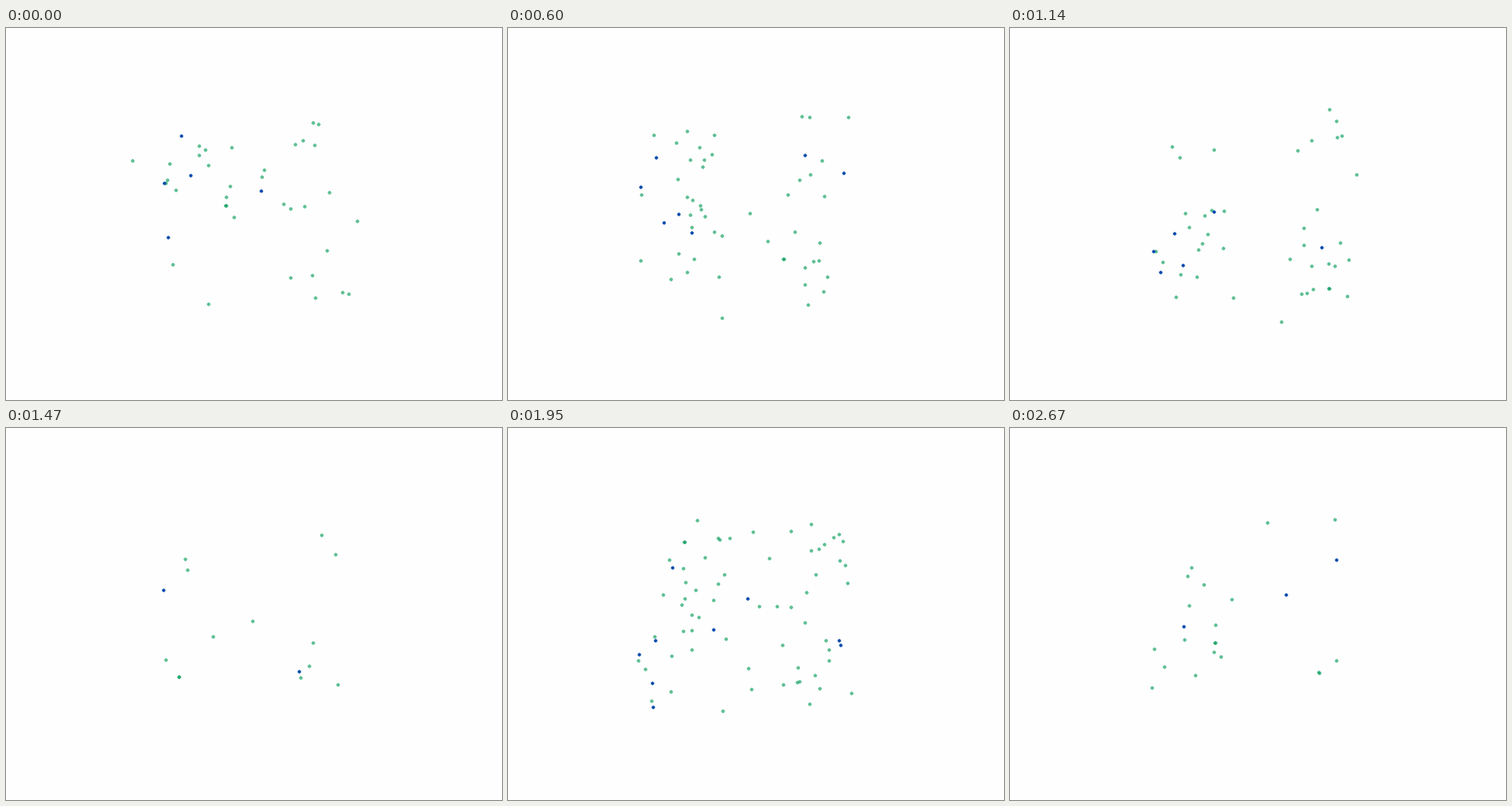
Recreate the animation shown at these times as a matplotlib script. Size 640x480 px, loop 2700 ms.

```python
import numpy as np
import matplotlib.pyplot as plt
from matplotlib.animation import FuncAnimation

W, H, DPI = 640, 480, 100
STEPS, INTERVAL = 90, 30
GREEN, BLUE, PAPER = "#009b55", "#0047ab", "#fefefe"

# The number of dots rises and falls between these points of the loop
KEY_STEPS = [0, 11, 28, 49, 65, 73, 79, 89]
KEY_COUNTS = [40, 31, 76, 15, 72, 24, 17, 23]
BLUE_SHARE = 0.13

# Dots gather around the hubs; the rest spread over the whole area
HUBS = np.array([(400, 138), (232, 172), (255, 250), (212, 308), (395, 322)])
HUB_SPREAD = 27
HUB_SHARE = 0.62
CENTRE, SPREAD = (315, 220), (85, 75)
TOP_LEFT, BOTTOM_RIGHT = np.array((160, 105)), np.array((466, 388))


def random_spots(rng, count):
    """Pick spots near a hub or anywhere, and keep those inside the area."""
    tries = 5 * count
    near = rng.normal(HUBS[rng.integers(len(HUBS), size=tries)], HUB_SPREAD)
    wide = rng.normal(CENTRE, SPREAD, (tries, 2))
    spots = np.where(rng.random((tries, 1)) < HUB_SHARE, near, wide)
    inside = np.all((spots > TOP_LEFT) & (spots < BOTTOM_RIGHT), axis=1)
    return spots[inside][:count]


def spots_at(step):
    """Every step shows a fresh, repeatable set of green and blue spots."""
    rng = np.random.default_rng(700 + step)
    total = round(np.interp(step, KEY_STEPS, KEY_COUNTS))
    blue_count = max(1, round(total * BLUE_SHARE))
    spots = random_spots(rng, total)
    # One pair nearly coincides and shows as a darker dot
    spots[-1] = spots[-2] + rng.uniform(-1, 1, 2)
    return spots[blue_count:], spots[:blue_count]


fig = plt.figure(figsize=(W / DPI, H / DPI), dpi=DPI, facecolor=PAPER)
ax = fig.add_axes([0, 0, 1, 1])
ax.set(xlim=(0, W), ylim=(H, 0))
ax.axis("off")

green = ax.scatter([], [], s=7, c=GREEN, alpha=0.6, linewidths=0.5)
blue = ax.scatter([], [], s=6.5, c=BLUE, linewidths=0.5, zorder=3)


def update(step):
    green_spots, blue_spots = spots_at(step)
    green.set_offsets(green_spots)
    blue.set_offsets(blue_spots)
    return green, blue


anim = FuncAnimation(fig, update, frames=STEPS, interval=INTERVAL,
                     repeat=True, repeat_delay=0)
plt.show()
```
